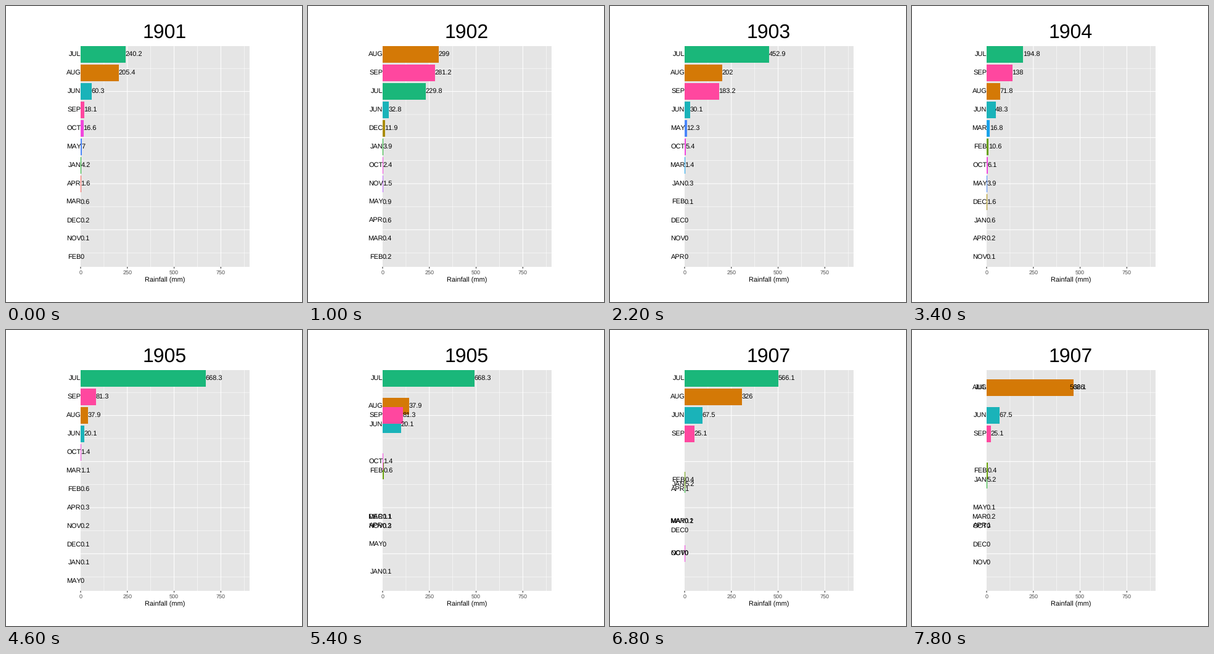
Recreate the animation shown at these times as a matplotlib script. Size 480 by 480 pixels, loop 8000 ms.

```python
import matplotlib.pyplot as plt
from matplotlib.animation import FuncAnimation
from matplotlib.patches import Rectangle

plt.rcParams["font.family"] = "Liberation Sans"
plt.rcParams["text.hinting"] = "none"
plt.rcParams["text.hinting_factor"] = 1

SIZE, DPI = 480, 100
PX = 72 / DPI                                # one pixel in points
LEFT, RIGHT, TOP, BOTTOM = 121, 395, 65, 423
MM = 75.8 / 250                              # pixels per mm of rain
ROW1, ROW = 78.8, 29.9                       # first row centre, row spacing
BAR = 0.9 * ROW
FIRST_YEAR = 1901
STEPS, CYCLE, LEAD = 4, 6, 2                 # transition, full period, opening hold

COLORS = dict(JAN="#1cb029", FEB="#68a008", MAR="#1aa3ea", APR="#f65b54",
              MAY="#4a86fa", JUN="#1ab3b9", JUL="#1ab77a", AUG="#d47906",
              SEP="#ff479f", OCT="#f047dd", NOV="#bd66fd", DEC="#a98c06")


def season(order, decay, *wet):
    """Month -> (place, rain): wet months as given, then a geometric fade."""
    year = {}
    for place, month in enumerate(order.split()):
        dry = max(0, place - len(wet) + 1)
        rain = wet[place - dry] * decay ** dry
        year[month] = place, round(rain, 1)
    return year


YEARS = [
    season("JUL AUG JUN SEP OCT MAY JAN APR MAR DEC NOV FEB", 0.38,
           240.2, 205.4, 60.3, 18.1, 16.6, 7, 4.2),
    season("AUG SEP JUL JUN DEC JAN OCT NOV MAY APR MAR FEB", 0.62,
           299, 281.2, 229.8, 32.8, 11.9, 3.9),
    season("JUL AUG SEP JUN MAY OCT MAR JAN FEB DEC NOV APR", 0.25,
           452.9, 202, 183.2, 30.1, 12.3, 5.4),
    season("JUL SEP AUG JUN MAR FEB OCT MAY DEC JAN APR NOV", 0.4,
           194.8, 138, 71.8, 48.3, 16.8, 10.6, 6.1, 3.9),
    season("JUL SEP AUG JUN OCT MAR FEB APR NOV DEC JAN MAY", 0.55,
           668.3, 81.3, 37.9, 20.1, 1.4, 1.1),
    season("JUL AUG JUN SEP FEB OCT DEC MAY NOV APR MAR JAN", 0.15,
           311.5, 247.1, 177.5, 134.8, 12.7, 5.9),
    season("JUL AUG JUN SEP JAN APR FEB MAR MAY DEC NOV OCT", 0.4,
           566.1, 326, 67.5, 25.1, 5.2, 1),
    season("AUG JUL JUN SEP FEB OCT MAY JAN MAR DEC NOV APR", 0.6,
           604, 324, 69, 19.5, 13, 1.5),
]

fig = plt.figure(figsize=(SIZE / DPI, SIZE / DPI), dpi=DPI, facecolor="white")
ax = fig.add_axes([0, 0, 1, 1])
ax.set_xlim(0, SIZE)
ax.set_ylim(SIZE, 0)
ax.axis("off")


def line(x, y, width, color="white"):
    ax.plot(x, y, color=color, lw=width * PX, solid_capstyle="butt",
            snap=False, zorder=1)


def text(x, y, s, size, ha="center", color="black"):
    return ax.text(x, y, s, fontsize=size * PX, ha=ha, va="baseline",
                   color=color, zorder=4)


def draw_panel():
    ax.add_patch(Rectangle((LEFT, TOP), RIGHT - LEFT, BOTTOM - TOP,
                           fc="#e5e5e5", lw=0, zorder=0))
    for k in range(5):                       # minor grid
        x = LEFT + (125 + 250 * k) * MM
        y = ROW1 + (0.75 + 2.5 * k) * ROW
        if x < RIGHT:
            line([x, x], [TOP, BOTTOM], 0.55)
        line([LEFT, RIGHT], [y, y], 0.55)
    for k in range(4):                       # major grid and ticks
        x = LEFT + 250 * k * MM
        y = ROW1 + (2 + 2.5 * k) * ROW
        if k:
            line([x, x], [TOP, BOTTOM], 1.1)
        line([LEFT, RIGHT], [y, y], 1.1)
        line([x, x], [BOTTOM, BOTTOM + 2.75], 1.1, "#333333")
        text(x, 435.2, str(250 * k), 8.8, color="#4d4d4d")
    text(257.6, 448.2, "Rainfall (mm)", 11)


draw_panel()
title = text(257.6, 52, "", 32)
bars, names, labels = {}, {}, {}
for month, color in COLORS.items():
    bar = Rectangle((LEFT, 0), 0, BAR, fc=color, lw=0, snap=False, zorder=2)
    bars[month] = ax.add_patch(bar)
    names[month] = text(LEFT + 0.5, 0, month, 11, "right")
    labels[month] = text(LEFT, 0, "", 11, "left")


def mix(a, b, p):
    return a + (b - a) * p


def update(n):
    start, step = divmod(n - LEAD, CYCLE)
    p = min((step + 1) / STEPS, 1)
    end = start + 1
    near = start if p <= 0.5 else end
    title.set_text(str(FIRST_YEAR + near))
    for month, bar in bars.items():
        place, rain = (mix(a, b, p) for a, b in
                       zip(YEARS[start][month], YEARS[end][month]))
        y = ROW1 + ROW * place
        width = rain * MM
        top = round(y - BAR / 2)             # bars sit on whole pixels
        bar.set_y(top)
        bar.set_height(round(y + BAR / 2) - top)
        bar.set_width(int(width + 0.65))
        names[month].set_y(y + 2.5)
        labels[month].set_position((LEFT + width - 0.4, y + 2.5))
        labels[month].set_text(f"{YEARS[near][month][1]:g}")
    return [title, *bars.values(), *names.values(), *labels.values()]


anim = FuncAnimation(fig, update, frames=40, interval=200,
                     repeat=True, repeat_delay=0, blit=False)
plt.show()
```
